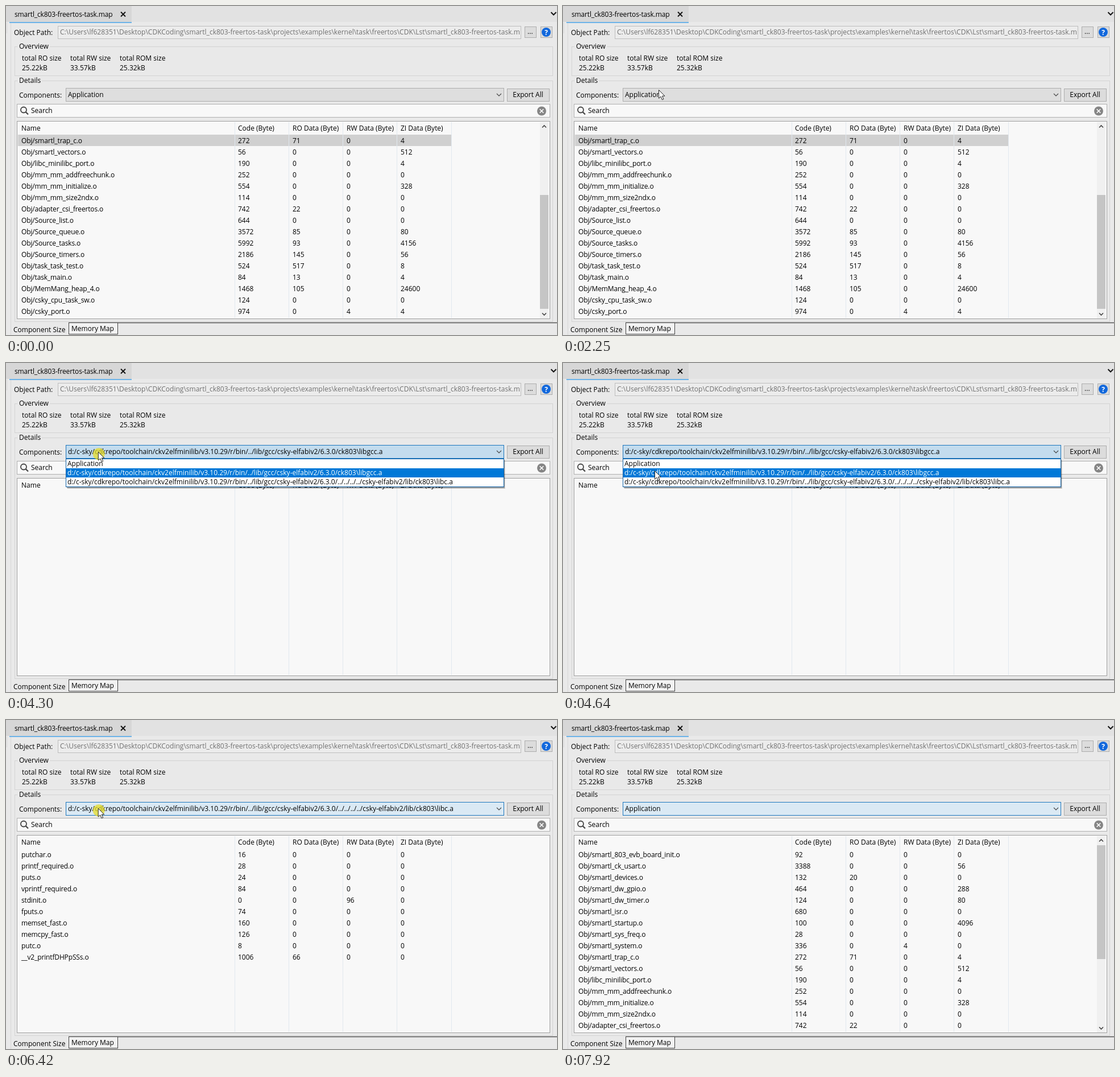
Animation of 969 by 578 pixels, one loop 7.99 s. Source, as an HTML page:

```html
<!DOCTYPE html>
<html lang="en">
<head>
<meta charset="utf-8">
<title>Memory map</title>
<style>
html, body { margin: 0; width: 100%; height: 100%; overflow: hidden; background: #e9e9e9 }
svg { display: block; font: 12px "Open Sans", "Noto Sans", sans-serif; fill: #000 }
text { white-space: pre }
</style>
</head>
<body>
<svg id="stage" width="969" height="578" viewBox="0 0 969 578"></svg>
<script>
const LOOP = 7990;
const COLUMNS = [408, 504, 599, 694];
const ROW_TOP = 226, ROW_HEIGHT = 20;
const LIB = 'd:/c-sky/cdkrepo/toolchain/ckv2elfminilib/v3.10.29/r/bin/../lib/gcc/csky-elfabiv2/6.3.0/';
const OPTIONS = ['Application', LIB + 'ck803\\libgcc.a', LIB + '../../../../csky-elfabiv2/lib/ck803\\libc.a'];

// Each entry: name, code, RO, RW, ZI; missing values are zero
const parse = (list, prefix) => list.split(',').map(line => {
  const [name, ...sizes] = line.trim().split(' ');
  return [prefix + name + '.o', ...COLUMNS.map((_, i) => sizes[i] || 0)];
});
const APP = parse(`smartl_803_evb_board_init 92, smartl_ck_usart 3388 0 0 56, smartl_devices 132 20,
  smartl_dw_gpio 464 0 0 288, smartl_dw_timer 124 0 0 80, smartl_isr 680, smartl_startup 100 0 0 4096,
  smartl_sys_freq 28, smartl_system 336 0 4, smartl_trap_c 272 71 0 4, smartl_vectors 56 0 0 512,
  libc_minilibc_port 190 0 0 4, mm_mm_addfreechunk 252, mm_mm_initialize 554 0 0 328, mm_mm_size2ndx 114,
  adapter_csi_freertos 742 22, Source_list 644, Source_queue 3572 85 0 80, Source_tasks 5992 93 0 4156,
  Source_timers 2186 145 0 56, task_task_test 524 517 0 8, task_main 84 13 0 4,
  MemMang_heap_4 1468 105 0 24600, csky_cpu_task_sw 124, csky_port 974 0 4 4`, 'Obj/');
const LIBC = parse(`putchar 16, printf_required 28, puts 24, vprintf_required 84, stdinit 0 0 96,
  fputs 74, memset_fast 160, memcpy_fast 126, putc 8, __v2_printfDHPpSSs 1006 66`, '');

// Pointer path: time, x, y
const PATH = [[190, 290, 487], [500, 262, 380], [750, 225, 210], [940, 190, 107], [1010, 180, 106],
  [1240, 75, 97], [1480, 28, 92], [1630, 29, 92], [1950, 90, 112], [2250, 168, 147], [2370, 168, 149],
  [2780, 164, 158], [3040, 160, 164], [3350, 145, 186], [3500, 143, 190], [3770, 143, 190],
  [4080, 161, 155], [4350, 162, 156], [4640, 161, 189], [4860, 156, 200], [5070, 153, 208],
  [5400, 153, 208], [5580, 205, 405], [5740, 222, 347], [5820, 222, 347], [6080, 190, 215],
  [6350, 162, 154], [6600, 161, 157], [6900, 143, 171], [6970, 143, 177], [7330, 143, 177]];
const CLICKS = [[2380, 2500], [3570, 3760], [4200, 4320], [5270, 5390], [6420, 6540], [6970, 7200]];
const POPUPS = [[2440, 3770], [4270, 5400], [6480, 7270]];
const HOT = [[850, 980], [2260, 5440], [6270, LOOP + 200]];

const within = (spans, t) => spans.some(([a, b]) => t >= a && t < b);
const clamp = v => Math.max(0, Math.min(1, v));
const text = (x, y, s, more = '') => `<text x="${x}" y="${y}" ${more}>${s}</text>`;
const box = (x, y, w, h, fill, stroke = 'none') =>
  `<rect x="${x + .5}" y="${y + .5}" width="${w}" height="${h}" fill="${fill}" stroke="${stroke}"/>`;
const fill = (x, y, w, h, color) => `<rect x="${x}" y="${y}" width="${w}" height="${h}" fill="${color}"/>`;
const line = (d, color, width = 1) => `<path d="${d}" fill="none" stroke="${color}" stroke-width="${width}"/>`;
const tight = 'letter-spacing="-.15"';

function group(y, h, label, width) {
  return box(15, y, 946, h, 'none', '#d3d3d3') + fill(20, y - 2, width, 5, '#e9e9e9') + text(23, y + 4, label);
}

function windowFrame() {
  return fill(0, 0, 969, 578, '#e9e9e9') +
    fill(0, 0, 969, 28, '#e2e2e2') + fill(0, 0, 221, 28, '#d7d7d7') + fill(6, 28, 215, 2, '#6db3e8') +
    line('M1.5 29V48M8.5 30V578', '#d8d8d8') +
    text(15, 19, 'smartl_ck803-freertos-task.map', tight) +
    line('M202 10.5l8 8m0-8l-8 8', '#111', 1.8) + line('M958.5 11l4.5 4.5 4.5-4.5', '#111', 2) +
    text(14, 51, 'Object Path:') + box(91, 35, 814, 22, '#ececec', '#bdbdbd') +
    '<clipPath id="field"><path d="M92 36H904V57H92z"/></clipPath>' +
    text(95, 50, 'C:\\Users\\lf628351\\Desktop\\CDKCoding\\smartl_ck803-freertos-task\\projects\\examples\\kernel\\task\\freertos\\CDK\\Lst\\smartl_ck803-freertos-task.m',
      'fill="#707070" clip-path="url(#field)"') +
    box(912, 36, 20, 19, '#dcdcdc', '#adadad') + text(917, 49, '...') +
    box(940, 36, 20, 19, '#dcdcdc', '#adadad') + '<circle cx="950" cy="46" r="8" fill="#1268dc"/>' +
    text(950, 50.5, '?', 'fill="#fff" font-weight="700" text-anchor="middle"') +
    group(71, 51, 'Overview', 57) +
    [[28, 'RO', '25.22'], [113, 'RW', '33.57'], [200, 'ROM', '25.32']].map(([x, kind, size]) =>
      text(x, 96, `total ${kind} size`) + text(x, 113, size + 'kB')).join('') +
    group(131, 423, 'Details', 43) + text(23, 161, 'Components:') +
    box(881, 145, 74, 22, '#dcdcdc', '#adadad') + text(918, 160, 'Export All', 'text-anchor="middle"') +
    box(19, 172, 937, 23, '#f8f8f8', '#b0b0b0') +
    '<circle cx="31" cy="182.5" r="5" fill="none" stroke="#444" stroke-width="1.8"/>' +
    line('M34.7 186.2l4.3 4.3', '#444', 2.2) + text(44, 188, 'Search') +
    '<circle cx="942" cy="184.5" r="8" fill="#858585"/>' + line('M938.7 181.2l6.6 6.6m0-6.6l-6.6 6.6', '#fff', 1.6) +
    text(13, 573, 'Component Size') + line('M110 556.5H969', '#555', 1.5) +
    box(110, 556, 86, 20, '#f2f2f2', '#444') + text(115, 571, 'Memory Map') +
    box(19, 202, 937, 347, '#f8f8f8', '#a0a0a0');
}

function table(rows, first, selected, hover) {
  const shown = rows.slice(first, first + 16);
  const band = (row, color) => fill(21, ROW_TOP + row * ROW_HEIGHT, 763, ROW_HEIGHT, color);
  let out = '';
  if (selected) out += band(0, '#d0d0d0');
  if (hover >= 0 && hover < shown.length && !(selected && hover === 0)) out += band(hover, '#dde9f4');
  out += line([402, 497, 592, 687, 783].map(x => `M${x}.5 204V548`).join(''), '#e1e8ef');
  out += text(27, 219, 'Name') + ['Code', 'RO Data', 'RW Data', 'ZI Data']
    .map((name, i) => text(COLUMNS[i], 219, name + ' (Byte)')).join('');
  shown.forEach(([name, ...sizes], i) => {
    const y = ROW_TOP + 15 + i * ROW_HEIGHT;
    out += text(27, y, name, tight) + sizes.map((size, c) => text(COLUMNS[c], y, size)).join('');
  });
  if (rows.length > 16)
    out += fill(939, 204, 15, 345, '#f0f0f0') + fill(939, first ? 332 : 220, 15, 200, '#c5c5c5') +
      line('M943 213.5l3.5-3.5 3.5 3.5M943 539.5l3.5 3.5 3.5-3.5', '#444', 1.6);
  return out;
}

function combo(label, heat, open) {
  return box(105, 144, 770, 23, '#dedede', '#adadad') +
    `<g opacity="${heat}">${box(105, 144, 770, 23, open ? '#c3dcee' : '#dae9f4', '#1c76bd')}</g>` +
    text(109, 160, label) + line('M863 154l4 4 4-4', '#444', 1.1);
}

function popup(active) {
  return fill(108, 171, 770, 50, '#0002') + fill(107, 170, 770, 50, '#0004') +
    box(105, 168, 770, 49, '#fff', '#0f62a8') + fill(106, 169 + active * 16, 769, 16, '#0078d7') +
    OPTIONS.map((name, i) => text(108, 181 + i * 16, name, i === active ? 'fill="#fff"' : '')).join('');
}

function pointer(t) {
  const i = PATH.findIndex(p => p[0] > t);
  if (i < 1) return null;
  const [a, b] = [PATH[i - 1], PATH[i]];
  const k = (t - a[0]) / (b[0] - a[0]);
  return [1, 2].map(n => a[n] + (b[n] - a[n]) * k);
}

function arrow([x, y]) {
  return `<path transform="translate(${x} ${y})" d="M.5 .5V15.2L4 12L6.4 17.7L8.9 16.6L6.5 11.1H11z" fill="#fff" stroke="#222"/>`;
}

function scene(t) {
  const choice = t < 3770 ? 0 : t < 5400 ? 1 : t < 7270 ? 2 : 0;
  const rows = [APP, [], LIBC][choice];
  const scrolled = t < 3770;
  const open = within(POPUPS, t);
  const at = pointer(t);
  const hover = at && !open ? Math.floor((at[1] - ROW_TOP) / ROW_HEIGHT) : -1;
  const heat = Math.max(...HOT.map(([a, b]) => clamp(Math.min((t - a) / 120, (b - t) / 120))));
  let out = table(rows, scrolled ? 9 : 0, scrolled, hover) + combo(OPTIONS[choice], heat, open);
  if (open) {
    const item = Math.floor((at[1] - 169) / 16);
    out += popup(item >= 0 && item < 3 ? item : choice);
  }
  if (at) {
    if (within(CLICKS, t))
      out += `<circle cx="${at[0] + 1.5}" cy="${at[1] + 4}" r="10.5" fill="#e6dc28" opacity=".75"/>`;
    out += arrow(at);
  }
  return out;
}

const stage = document.getElementById('stage');
stage.innerHTML = windowFrame() + '<g id="live"></g>';
const live = document.getElementById('live');
const start = performance.now();
let last = '';
function draw() {
  const next = scene((performance.now() - start) % LOOP);
  if (next !== last) live.innerHTML = last = next;
  requestAnimationFrame(draw);
}
draw();
</script>
</body>
</html>
```
